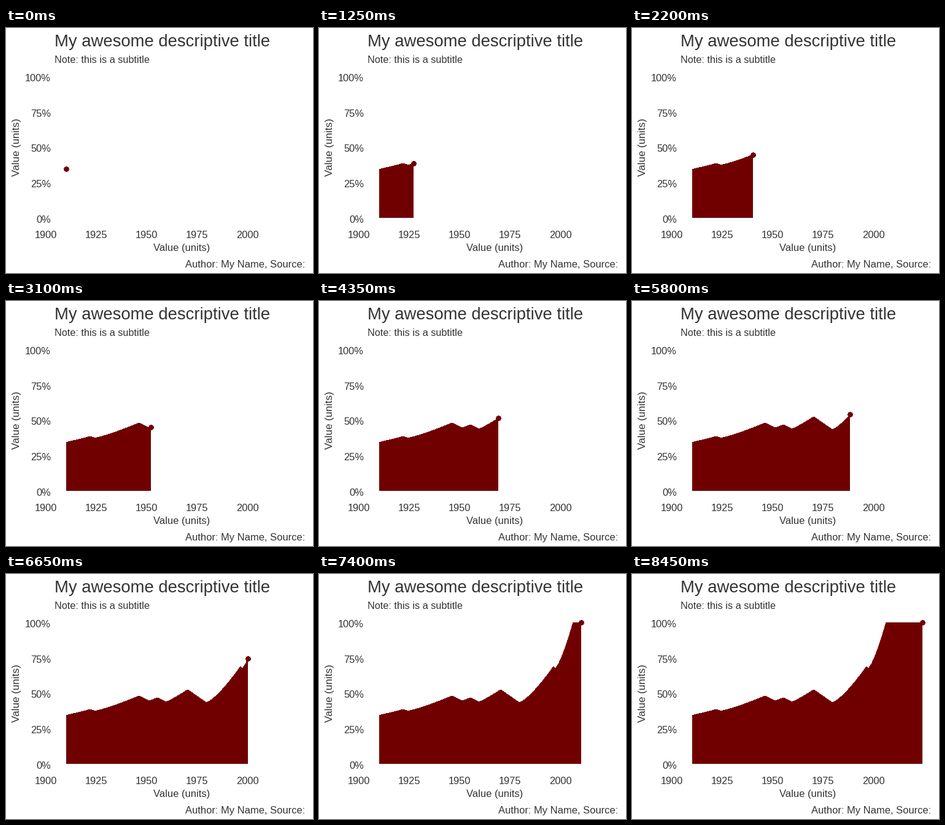
A matplotlib script for the animation above (10 s loop, 500 by 400 pixels).

```python
import matplotlib.pyplot as plt
import numpy as np
from matplotlib.animation import FuncAnimation
from matplotlib.patches import Circle, Polygon

W, H, DPI = 500, 400, 100
FRAMES, REVEAL, INTERVAL = 200, 169, 50
INK, FILL = "#333333", "#700000"
LEFT, RIGHT, BASE = 98, 473, 310

# Peaks and dips of the series, in stage pixels
TURNS = [(LEFT, 230.6), (137, 221.2), (145, 223.6), (217, 199), (233, 207.3),
         (247, 202), (260, 209), (296, 189), (326, 210), (382, 151),
         (385, 154), (414, 79), (RIGHT, 79)]

# Each year lands on a whole step; steps in between are interpolated
YEARS = np.arange(115)
STEPS = np.round(YEARS * REVEAL / YEARS[-1])


def series():
    """Join the turns; the higher a rise, the more it accelerates."""
    xs = np.arange(LEFT, RIGHT + 1)
    ys = np.empty(len(xs))
    for (x0, y0), (x1, y1) in zip(TURNS, TURNS[1:]):
        part = (xs >= x0) & (xs <= x1)
        bend = 1 + 0.35 * np.clip((y0 - y1) / 40, 0, 1)
        ys[part] = y0 + (y1 - y0) * ((xs[part] - x0) / (x1 - x0)) ** bend
    return np.column_stack([xs, ys])


CURVE = series()

plt.rcParams["font.family"] = "Liberation Sans"
fig = plt.figure(figsize=(W / DPI, H / DPI), dpi=DPI, facecolor="white")
ax = fig.add_axes([0, 0, 1, 1])
ax.set_xlim(0, W)
ax.set_ylim(H, 0)
ax.axis("off")


def label(x, y, text, px=16.4, ha="left", rotation=0):
    ax.text(x, y, text, fontsize=px * 72 / DPI, color=INK, ha=ha,
            va="baseline", rotation=rotation, rotation_mode="anchor")


label(79, 30, "My awesome descriptive title", 27.5)
label(79, 57, "Note: this is a subtitle", 16.2)
for k in range(5):
    label(73, 318 - 57.75 * k, f"{25 * k}%", ha="right")
    label(64.6 + 82.1 * k, 343, str(1900 + 25 * k), ha="center")
label(286, 364, "Value (units)", 16.5, "center")
label(22, 194.3, "Value (units)", 17, "center", 90)
label(487, 391, "Author: My Name, Source:", 16.5, "right")

area = Polygon([(LEFT, BASE)] * 3, closed=True, facecolor=FILL,
               edgecolor="none", linewidth=0, antialiased=False)
dot = Circle((LEFT, BASE), 3.65, facecolor=FILL, edgecolor="none",
             linewidth=0, antialiased=False)
for patch in (area, dot):
    patch.set_snap(False)
    ax.add_patch(patch)


def draw(i):
    year = np.interp(i, STEPS, YEARS)
    n = round((RIGHT - LEFT) * year / YEARS[-1])
    x, y = CURVE[n]
    area.set_xy(np.vstack([(LEFT, BASE), CURVE[:n + 1], (x, BASE)]))
    dot.center = (x + 0.5, np.floor(y) + 0.5)
    return area, dot


anim = FuncAnimation(fig, draw, frames=FRAMES, interval=INTERVAL,
                     repeat=True, repeat_delay=0, blit=False)
plt.show()
```
